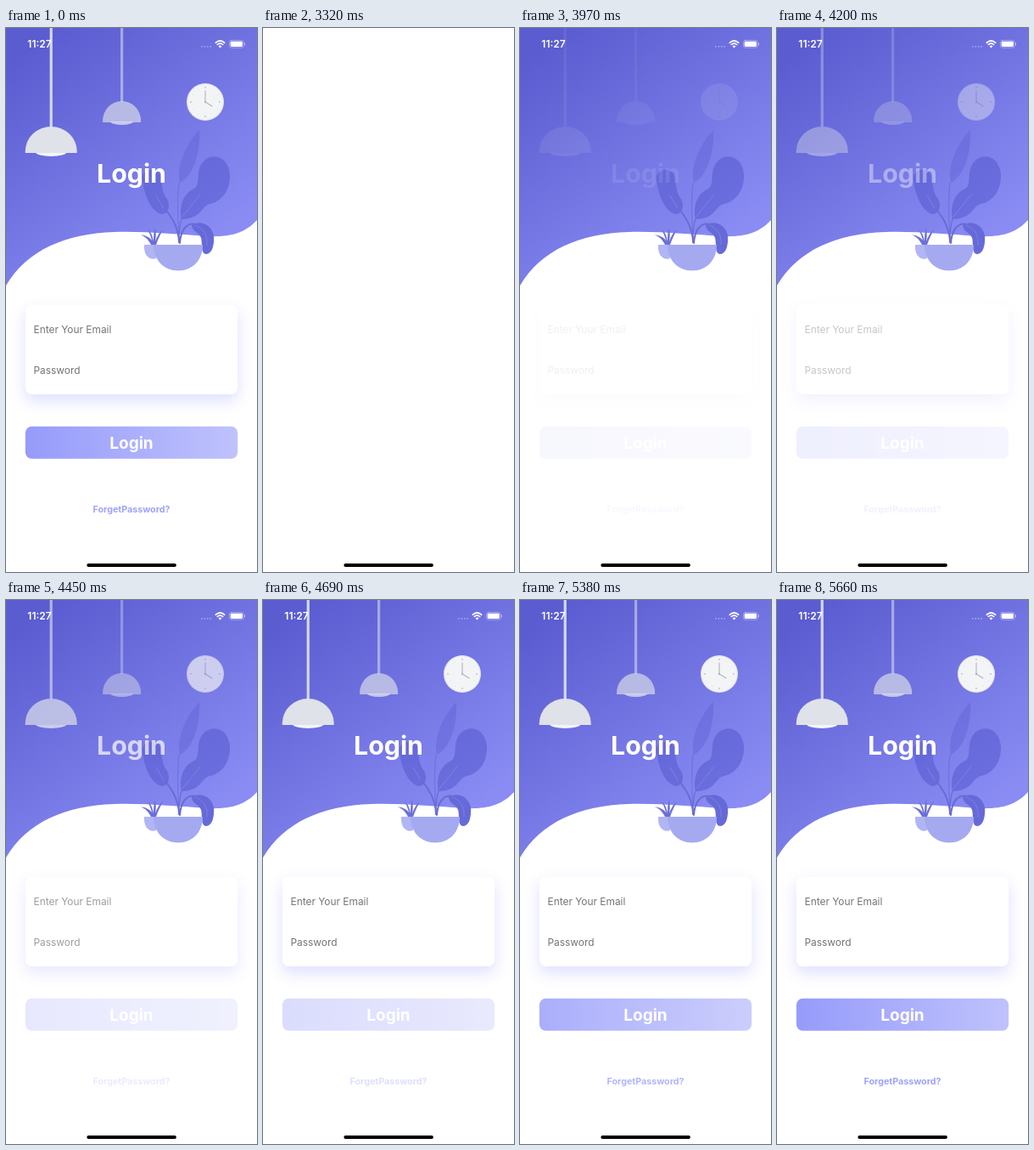
An HTML page with a canvas that plays this animation: 296x640 px, repeating every 6140 ms.

```html
<!DOCTYPE html>
<html lang="en">
<head>
<meta charset="utf-8">
<title>Login screen</title>
<style>
html, body { margin: 0; width: 100%; height: 100%; overflow: hidden; background: #fff; }
canvas { display: block; width: 296px; height: 640px; }
</style>
</head>
<body>
<canvas id="stage"></canvas>
<script>
const W = 296, H = 640, LOOP = 6140;
const BLANK_AT = 3320, HEADER_AT = 3680, FADE_AT = 3970;
const dpr = window.devicePixelRatio || 1;
const FONT = 'Inter, Roboto, "Liberation Sans", sans-serif';

// [start time, opacity]; the picture holds between steps
const TOP_STEPS = [[3970, .1], [4090, .25], [4200, .4], [4330, .55], [4450, .7], [4570, .85], [4690, 1]];
const BUTTON_STEPS = [[3970, .07], [4200, .15], [4450, .22], [4690, .34], [4920, .48], [5150, .62], [5380, .8], [5660, 1]];

function setup(canvas) {
  canvas.width = W * dpr;
  canvas.height = H * dpr;
  const c = canvas.getContext('2d');
  c.scale(dpr, dpr);
  return c;
}

function layer(draw) {
  const canvas = document.createElement('canvas');
  draw(setup(canvas));
  return canvas;
}

function shape(c, d, fill) {
  c.fillStyle = fill;
  c.fill(new Path2D(d));
}

function line(c, d, color, width) {
  c.strokeStyle = color;
  c.lineWidth = width;
  c.lineCap = 'round';
  c.stroke(new Path2D(d));
}

function disc(c, x, y, r, fill) {
  c.fillStyle = fill;
  c.beginPath();
  c.arc(x, y, r, 0, Math.PI * 2);
  c.fill();
}

function box(c, x, y, w, h, r, fill) {
  c.fillStyle = fill;
  c.beginPath();
  c.roundRect(x, y, w, h, r);
  c.fill();
}

function text(c, str, x, y, size, weight, color, align = 'center') {
  c.font = `${weight} ${size}px ${FONT}`;
  c.textAlign = align;
  c.fillStyle = color;
  c.fillText(str, x, y);
}

function gradient(c, x0, y0, x1, y1, from, to) {
  const g = c.createLinearGradient(x0, y0, x1, y1);
  g.addColorStop(0, from);
  g.addColorStop(1, to);
  return g;
}

function drawHeader(c) {
  shape(c, 'M0 0H296V226C281 242 264 246 238 245C203 243 165 239 128 240C70 242 25 261 0 303Z',
    gradient(c, 60, 0, 240, 250, '#5a5cd0', '#8a8cf4'));
  drawPlant(c);
}

function drawPlant(c) {
  const pale = 'rgba(84,87,206,.32)', leaf = 'rgba(84,87,206,.52)', stem = '#686bd6';
  // tall leaf
  shape(c, 'M228 120C229 140 224 172 205 182C200 165 212 136 228 120Z', pale);
  line(c, 'M204 250C203 225 201 205 204 182', 'rgba(84,87,206,.4)', 1.2);
  // left leaf
  shape(c, 'M161 179C159 168 172 163 180 170C186 177 181 190 190 201C194 209 192 218 184 219C172 217 163 198 161 179Z', leaf);
  line(c, 'M177 197C184 212 203 224 204 252', stem, 1.8);
  line(c, 'M177 197L186 212', '#8588e6', .8);
  // big right leaf
  shape(c, 'M207 225C204 211 208 195 222 189C230 184 223 169 232 158C242 146 262 150 264 172C265 191 254 205 240 207C230 210 230 225 207 225Z', leaf);
  line(c, 'M229 196L208 222', '#8588e6', .8);
  line(c, 'M208 223C204 230 204 242 204 252', stem, 1.2);
  // drooping leaf
  line(c, 'M205 253C206 238 213 228 224 231', stem, 2);
  shape(c, 'M219 232C228 226 242 230 245 244C246 255 243 266 236 266C229 265 232 254 230 247C228 240 220 241 219 232Z', '#666ad8');
  line(c, 'M223 232C233 235 238 244 237 255', '#8184e4', .8);
  // grass
  shape(c, 'M171 255C168 249 164 245 158 243C165 244 169 246 172 250C171 245 169 241 167 237C172 241 173 246 174 251C174 245 174 240 176 235C177 241 177 246 176 251C178 246 180 241 185 237C182 243 179 249 177 255Z', '#6c6fd9');
  // pots
  shape(c, 'M163 255H177V271C169 274 162 267 163 255Z', '#b1b5f4');
  shape(c, 'M174 255H232C232 273 220 285.500 203 285.500C186 285.500 174 273 174 255Z', '#a5a9f0');
}

function drawStatus(c) {
  text(c, '11:27', 39.5, 23, 12, 600, '#fff');
  for (let i = 0; i < 4; i++) disc(c, 231 + i * 3.4, 21.8, .85, 'rgba(255,255,255,.45)');
  line(c, 'M247.300 17.300Q252.500 12.700 257.700 17.300', '#fff', 1.7);
  line(c, 'M249.200 19.500Q252.500 16.700 255.800 19.500', '#fff', 1.6);
  shape(c, 'M250.500 21.400Q252.500 19.800 254.500 21.400L252.500 23.500Z', '#fff');
  c.strokeStyle = 'rgba(255,255,255,.45)';
  c.lineWidth = .8;
  c.beginPath();
  c.roundRect(263.4, 14.6, 16.8, 8.6, 2.4);
  c.stroke();
  box(c, 264.7, 15.8, 14.2, 6.2, 1.4, '#fff');
  box(c, 281, 17.3, 1, 3.2, .5, 'rgba(255,255,255,.5)');
}

function drawLamp(c, x, top, base, half, color, cord, bulb) {
  const h = base - top, w = half * .6;
  box(c, x - 1.6, 0, 3.2, top + 1, 0, cord);
  c.fillStyle = bulb;
  c.beginPath();
  c.ellipse(x, base - 1, w, h * .16, 0, 0, Math.PI);
  c.fill();
  c.fillStyle = color;
  c.beginPath();
  c.ellipse(x, base - 2, half, h - 2, 0, Math.PI, Math.PI * 2);
  c.lineTo(x + half, base);
  c.lineTo(x - half, base);
  c.fill();
}

function drawClock(c) {
  const x = 235, y = 87;
  disc(c, x, y, 22, '#e5e7ee');
  disc(c, x, y, 20.8, '#f3f4f5');
  for (let i = 0; i < 12; i++) {
    const a = i * Math.PI / 6;
    disc(c, x + 17 * Math.sin(a), y - 17 * Math.cos(a), i % 3 ? .4 : .9, '#bfc2cb');
  }
  line(c, `M${x} 74V${y}L243 92`, '#b0b3bf', 1.1);
  disc(c, x, y, 1.2, '#b0b3bf');
}

function drawTop(c) {
  drawLamp(c, 53.2, 116, 147, 30.5, '#dfe2e9', '#d5d8ef', '#f4f5f7');
  drawLamp(c, 136.6, 86, 111, 22.5, 'rgba(223,226,233,.65)', 'rgba(213,216,239,.6)', 'rgba(244,245,247,.65)');
  drawClock(c);
  text(c, 'Login', 148, 181.5, 30.3, 700, '#fff');
  c.save();
  c.shadowColor = 'rgba(143,148,251,.3)';
  c.shadowBlur = 18 * dpr;
  c.shadowOffsetY = 7.6 * dpr;
  box(c, 22.8, 325.5, 250.4, 105.5, 7.6, '#fff');
  c.restore();
  text(c, 'Enter Your Email', 32.5, 358.5, 11.9, 400, '#757575', 'left');
  text(c, 'Password', 32.5, 407, 11.9, 400, '#757575', 'left');
}

function drawButton(c) {
  box(c, 22.8, 468.7, 250.4, 38, 7.6, gradient(c, 23, 0, 273, 0, '#969bfb', '#bfc2fc'));
  text(c, 'Login', 148, 494.7, 19, 700, '#fff');
  text(c, 'ForgetPassword?', 148, 569.5, 10.7, 700, '#9ea2fa');
}

const ctx = setup(document.getElementById('stage'));
const header = layer(drawHeader);
const status = layer(drawStatus);
const topGroup = layer(drawTop);
const buttonGroup = layer(drawButton);

function opacity(steps, t) {
  if (t < BLANK_AT) return 1;
  let value = 0;
  for (const [at, v] of steps) if (t >= at) value = v;
  return value;
}

function put(image, alpha = 1) {
  ctx.globalAlpha = alpha;
  ctx.drawImage(image, 0, 0, W, H);
  ctx.globalAlpha = 1;
}

function render(t) {
  ctx.fillStyle = '#fff';
  ctx.fillRect(0, 0, W, H);
  if (t < BLANK_AT || t >= HEADER_AT) {
    put(header);
    if (t < BLANK_AT || t >= FADE_AT) {
      put(topGroup, opacity(TOP_STEPS, t));
      put(buttonGroup, opacity(BUTTON_STEPS, t));
    }
    put(status);
  }
  box(ctx, 95.3, 630, 105.6, 4, 2, '#000');
}

const start = performance.now();
function tick() {
  render((performance.now() - start) % LOOP);
  requestAnimationFrame(tick);
}
tick();
</script>
</body>
</html>
```
